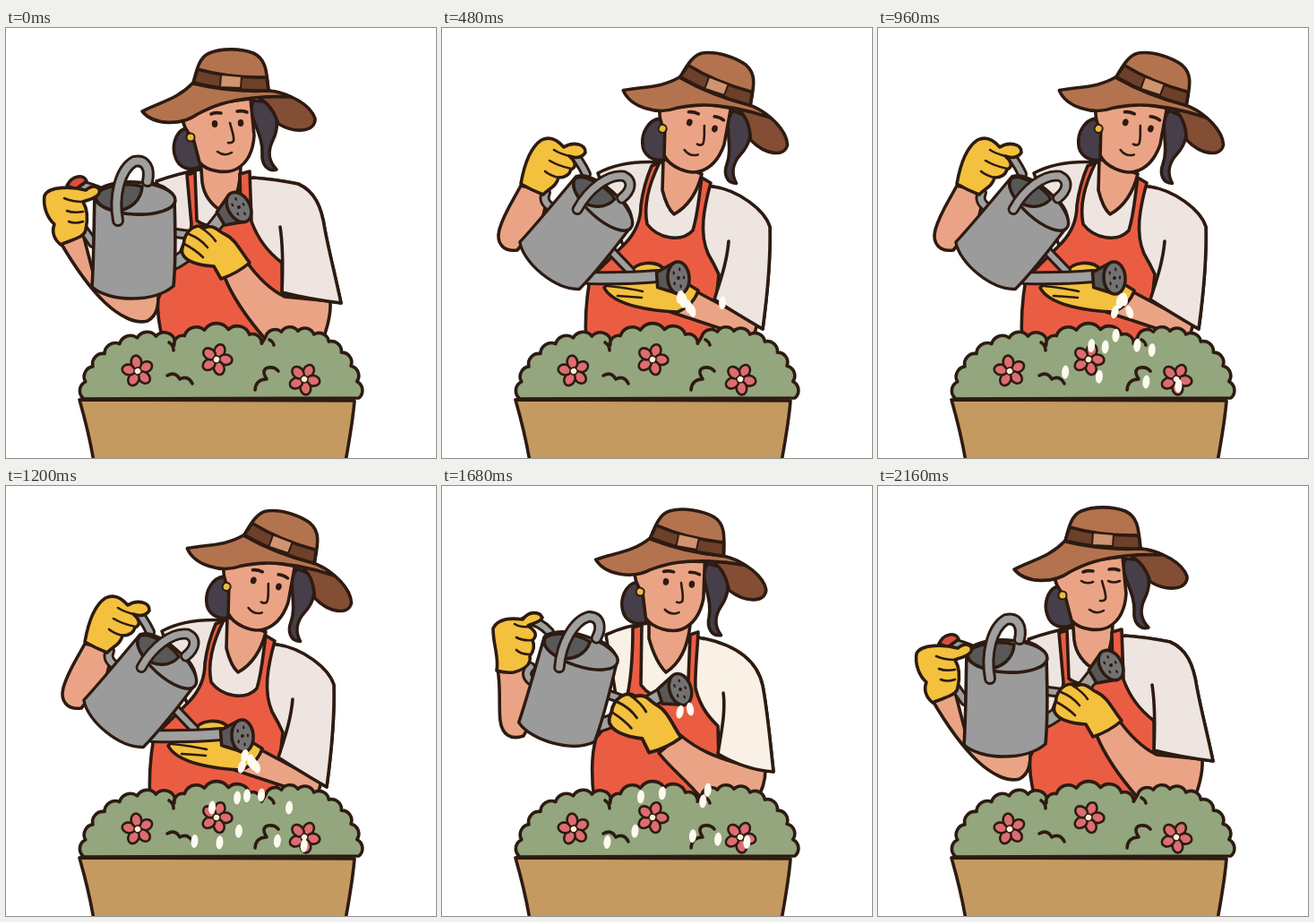
An HTML page that plays this animation: 480 px wide and 480 px high, repeating every 2.4 s.

```html
<!DOCTYPE html>
<html lang="en">
<head>
<meta charset="utf-8">
<title>Watering the flowers</title>
<style>
  html, body { margin: 0; width: 100%; height: 100%; overflow: hidden; background: #fff; }
  svg { display: block; width: 100%; height: 100%; }
  path, ellipse, circle { stroke: #2d1b12; stroke-width: 3.6; stroke-linecap: round; stroke-linejoin: round; }
  .line { fill: none; }
  .thin { fill: none; stroke-width: 2.6; }
  .dot { fill: #2d1b12; stroke: none; }
  .skin { fill: #eaa485; }
  .hair { fill: #463e48; }
  .hat { fill: #b4734f; }
  .under { fill: #834e34; }
  .band { fill: #6d4029; }
  .buckle { fill: #cf9470; stroke-width: 2; }
  .shirt { fill: #eee5e1; }
  .cream { fill: #f9f1e5; }
  .apron { fill: #eb5d43; }
  .glove { fill: #f3c13d; }
  .gold { fill: #edb93c; stroke-width: 2; }
  .red { fill: #d9503c; }
  .can { fill: #9a9b9a; }
  .dark { fill: #595859; }
  .rose { fill: #727273; }
  .bush { fill: #93a67d; }
  .box { fill: #c59a60; }
  .petal { fill: #dd6d70; stroke-width: 2.6; }
  .heart { fill: #fbeedb; stroke-width: 1.6; }
  .drop { fill: #fffaf0; stroke: none; }
</style>
</head>
<body>
<svg id="stage" viewBox="0 0 480 480"></svg>
<script>
const STEP = 240, STEPS = 10;
const stage = document.getElementById('stage');

const p = (cls, d) => `<path class="${cls}" d="${d}"/>`;
const group = (place, body) => `<g transform="${place}">${body}</g>`;
const oval = (cls, x, y, rx, ry, turn = 0) =>
  `<ellipse class="${cls}" cx="${x}" cy="${y}" rx="${rx}" ry="${ry}" transform="rotate(${turn} ${x} ${y})"/>`;
const tube = (d, w = 6) =>
  `<path d="${d}" fill="none" style="stroke-width:${w + 6}"/>` +
  `<path d="${d}" fill="none" style="stroke:#9fa09f;stroke-width:${w}"/>`;
const around = (n, draw) => Array.from({ length: n }, (_, k) => draw(360 / n * k)).join('');

const rose = (x, y, turn) => group(`translate(${x} ${y}) rotate(${turn})`,
  p('dark', 'M-24 -8L-4 -17L-3 17L-24 9Z') + oval('rose', 0, 0, 12, 18) +
  oval('dot', 0, 0, 2, 2) + around(5, a => group(`scale(.6 1) rotate(${a})`, oval('dot', 10, 0, 2, 2))));

// Built around its own middle, then set and tilted per pose
const can = (x, y, turn, size) => group(`translate(${x} ${y}) rotate(${turn}) scale(${size})`,
  p('can', 'M-43 -53C-44 -16 -44 22 -46 51C-27 68 23 69 45 50C48 20 47 -16 46 -47C39 -64 18 -68 1 -64Z') +
  oval('can', 2, -48, 45, 18, 3) +
  p('dark', 'M-42 -51C-36 -62 -6 -66 10 -61C9 -46 -3 -34 -21 -34C-34 -37 -42 -43 -42 -51Z') +
  tube('M-17 -23C-22 -50 -15 -80 1 -89C14 -92 19 -81 16 -67', 8));

const holdingGlove =
  p('glove', 'M199 236C203 223 214 218 222 223C233 218 239 229 244 230C257 236 262 250 272 262Q258 274 240 280L232 266C216 265 201 261 197 252C195 246 199 242 199 236Z') +
  p('thin', 'M204 230Q217 235 225 245M199 241Q212 248 220 256M216 222Q229 230 234 238');

const eyesOpen = oval('dot', 233, 107, 3.3, 4) + oval('dot', 262, 106, 3.3, 4);
const eyesShut = p('thin', 'M227 106Q233 110 240 107M257 106Q263 109 270 106');

const head = (eyes, place) => group(place,
  p('hair', 'M200 112C188 117 185 133 189 144C193 157 206 160 217 155L215 126Z') +
  p('hair', 'M276 81L297 83C304 102 304 113 298 125C292 137 293 149 302 158C291 161 285 151 286 140C287 125 279 112 273 92Z') +
  p('skin', 'M196 96C197 108 201 116 209 123L216 150C225 161 247 163 258 157C270 150 276 136 277 120L273 79C245 82 215 88 196 96Z') +
  oval('gold', 206, 122, 4.5, 4.5) +
  p('line', 'M229 96Q234 94 240 95M258 93Q264 92 269 94') + eyes +
  p('thin', 'M250 106C252 114 255 121 254 126Q252 129 248 128') +
  p('thin', 'M236 138Q244 144 252 139') +
  p('under', 'M285 71L293 70C318 73 340 86 345 101C346 115 325 119 304 107C300 95 294 84 283 79Z') +
  p('hat', 'M152 93C174 82 192 79 209 61L293 70Q306 71 318 77Q297 76 276 78C247 81 231 87 214 96C196 109 165 109 152 93Z') +
  p('hat', 'M209 62C213 44 217 32 227 28C241 22 263 23 276 28C289 34 291 45 293 70Q250 72 209 62Z') +
  p('band', 'M214 46Q249 56 291 55L293 70Q249 71 209 61Z') +
  p('buckle', 'M240 52L263 54L262 67L239 66Z'));

const poseA = eyes =>
  p('skin', 'M60 238C74 262 92 289 111 307C126 321 144 331 158 327C169 321 171 309 170 292L100 284L86 230Z') +
  p('shirt', 'M216 158Q190 163 168 171L190 290L306 296L374 307C367 274 360 247 356 225C352 198 344 182 326 174Q302 169 272 167Z') +
  p('skin', 'M217 145L219 172C221 188 231 199 243 206C255 196 262 182 262 150Z') +
  p('apron', 'M202 164L211 161L213 215C228 226 248 222 262 204L261 163L272 160L274 216C282 238 296 253 308 262L309 350L175 350C172 334 168 318 170 302C180 280 190 263 197 244Q207 233 207 219Z') +
  p('skin', 'M268 260C282 280 297 293 311 300L362 305C363 322 357 339 352 353L290 348C271 326 253 301 244 278Z') +
  p('shirt', 'M306 222C310 248 309 273 308 295Q340 303 374 307C367 274 360 247 356 225C352 198 344 182 326 174Q302 169 276 167') +
  tube('M104 182C88 176 76 171 72 180M86 224L97 240') +
  p('red', 'M68 176C74 164 87 163 90 171L78 180Z') +
  tube('M182 228L205 231') + tube('M184 264C205 255 222 235 240 212', 11) +
  can(142, 238, 0, 1) + rose(260, 200, -31) + holdingGlove +
  p('glove', 'M43 187C48 176 75 177 89 181C99 173 108 179 103 186C98 191 91 192 86 194C92 204 91 216 89 225C88 234 74 236 61 242C53 235 51 227 54 219C46 212 41 199 43 187Z') +
  p('thin', 'M86 194Q74 194 65 190M86 205Q75 207 68 204M86 216Q77 219 70 216') +
  head(eyes, '');

const poseB =
  p('skin', 'M62 204C66 225 63 245 65 262C67 277 76 284 91 279L112 240L92 204Z') +
  p('cream', 'M232 153Q207 155 183 166L200 270L308 298L370 319C366 282 363 249 358 223C352 195 329 178 290 170Z') +
  p('skin', 'M231 148L231 170C236 188 242 200 250 208C264 199 274 183 277 155Z') +
  p('apron', 'M213 158L223 155L222 222C236 241 263 242 275 216L277 166L286 163C285 185 282 209 283 226C289 249 300 260 308 268L310 350L170 350C167 330 166 302 172 281L205 242Q213 212 213 158Z') +
  p('skin', 'M266 278C287 296 308 303 328 309L361 317C361 331 356 343 350 352L289 348C274 329 255 315 242 298Z') +
  p('cream', 'M314 231C317 253 311 278 308 299Q339 317 370 319C366 282 363 249 358 223C352 195 329 178 292 170') +
  tube('M120 163Q106 148 92 151M99 202Q91 210 99 217') +
  tube('M184 232L206 240') + tube('M176 267C200 260 222 246 243 234', 11) +
  can(141, 228, 15, .96) + rose(266, 227, -18) +
  group('translate(228 265) rotate(4) scale(1.08) translate(-235 -250)', holdingGlove) +
  p('glove', 'M57 159C63 147 77 147 90 149C97 139 109 140 112 147C109 153 100 153 96 156C103 161 108 166 101 172C104 179 102 185 98 190C100 199 91 205 80 208Q70 209 61 206C64 191 57 178 57 159Z') +
  p('thin', 'M97 157Q87 158 81 154M101 172Q90 173 83 169M98 188Q88 188 83 183') +
  head(eyesOpen, 'translate(18 2) rotate(7.7 248.5 98.5)');

const poseC =
  p('skin', 'M88 176C79 193 69 207 64 225C60 241 69 250 84 248L112 214L119 183Z') +
  p('shirt', 'M245 150Q202 147 174 162L208 260L306 308L358 336C363 299 367 259 366 222C360 203 331 181 297 176Z') +
  p('skin', 'M247 146L246 181Q251 201 259 208C275 199 285 183 290 163Z') +
  p('apron', 'M234 154L243 150C231 174 225 199 229 219C241 235 267 240 280 226C286 207 287 186 290 167L300 173C292 202 287 229 297 252Q304 264 309 275L301 350L161 350C159 326 162 298 165 280L205 240Q222 222 222 198Q225 175 234 154Z') +
  p('skin', 'M280 292Q311 309 352 330L348 344L328 341L255 317Z') +
  p('shirt', 'M320 238C318 262 310 284 304 303Q327 318 358 336C363 299 367 259 366 222C360 203 331 181 303 177') +
  p('glove', 'M181 290C187 280 203 284 210 273C216 261 239 258 249 270L286 293Q281 309 263 317C238 316 192 311 181 290Z') +
  p('thin', 'M185 288Q206 290 224 294M196 299Q211 300 223 301') +
  tube('M188 248L210 271') + tube('M163 279Q205 280 240 277', 10) +
  tube('M143 136Q154 148 161 163M116 184Q111 194 123 201') +
  can(150, 229, 39, .93) + rose(264, 279, -4) +
  p('glove', 'M88 174C92 151 99 133 111 125C121 120 130 126 136 133C147 126 161 130 160 139C156 146 147 145 142 143C149 149 151 155 144 158C142 165 136 167 130 167C128 177 118 180 113 186Q100 181 88 174Z') +
  p('thin', 'M142 143Q131 140 125 136M144 157Q130 154 120 148M130 167Q121 165 115 160') +
  head(eyesOpen, 'translate(45 3) rotate(16 248.5 98.5)');

// Scalloped edge: n bumps along part of an ellipse
function lobe(cx, cy, rx, ry, from, to, n) {
  const at = i => {
    const a = (from + (to - from) * i / n) * Math.PI / 180;
    return [cx + rx * Math.cos(a), cy + ry * Math.sin(a)];
  };
  let d = `L${at(0)}`;
  for (let i = 1; i <= n; i++) {
    const [x0, y0] = at(i - 1), [x, y] = at(i);
    const r = Math.hypot(x - x0, y - y0) * 0.6;
    d += `A${r} ${r} 0 0 1 ${x} ${y}`;
  }
  return d;
}

const flower = (x, y, turn) => group(`translate(${x} ${y}) rotate(${turn})`,
  around(5, a => group(`rotate(${a})`, oval('petal', 10, 0, 7.5, 5.8))) + oval('heart', 0, 0, 4, 4));

const planter =
  p('bush', 'M84 414' + lobe(165, 413, 79, 69, 180, 287, 7) +
    lobe(237, 358, 50, 22, 190, 345, 5) + lobe(320, 413, 74, 75, 246, 360, 8) + 'Z') +
  p('line', 'M182 351Q187 354 187 360M294 348Q298 350 299 354') +
  p('line', 'M180 388Q189 383 194 392Q203 387 208 397M278 404Q279 392 291 392Q284 381 293 379Q300 378 304 383') +
  flower(147, 383, -27) + flower(235, 370, -70) + flower(333, 392, -62) +
  p('box', 'M82 415L389 416C387 440 383 462 379 484L98 484C94 460 88 436 82 415Z');

const order = [0, 1, 2, 2, 2, 2, 2, 1, 0, 3];

// Each batch leaves the rose, fans out and lives for three steps
const rand = n => { const v = Math.sin(n * 12.9898) * 43758.5453; return v - Math.floor(v); };
function drops(step) {
  let out = '';
  for (let age = 0; age < 3; age++) {
    const batch = step - age;
    if (batch < 1 || batch > 7) continue;
    const top = order[batch] === 2 ? 296 : 243;
    const count = Math.round(5 * Math.sin(Math.PI * batch / 8));
    for (let k = 0; k < count; k++) {
      const seed = batch * 10 + k;
      const side = (k + rand(seed)) / count - 0.5;
      const x = 272 + side * (20 + 85 * age) - 2 * age;
      const y = top + 42 * age + rand(seed + 0.5) * 22;
      out += oval('drop', x, y, 4, 7.5, age ? 5 : -side * 40);
    }
  }
  return out;
}

const poses = [poseA(eyesOpen), poseB, poseC, poseA(eyesShut)];
stage.innerHTML = poses.map(s => `<g class="pose">${s}</g>`).join('') + planter +
  order.map((_, i) => `<g class="water">${i < 8 ? drops(i) : ''}</g>`).join('');
const poseEls = stage.querySelectorAll('.pose');
const waterEls = stage.querySelectorAll('.water');

function draw() {
  const step = Math.floor(performance.now() / STEP) % STEPS;
  poseEls.forEach((g, i) => g.style.display = i === order[step] ? '' : 'none');
  waterEls.forEach((g, i) => g.style.display = i === step ? '' : 'none');
  requestAnimationFrame(draw);
}
draw();
</script>
</body>
</html>
```
